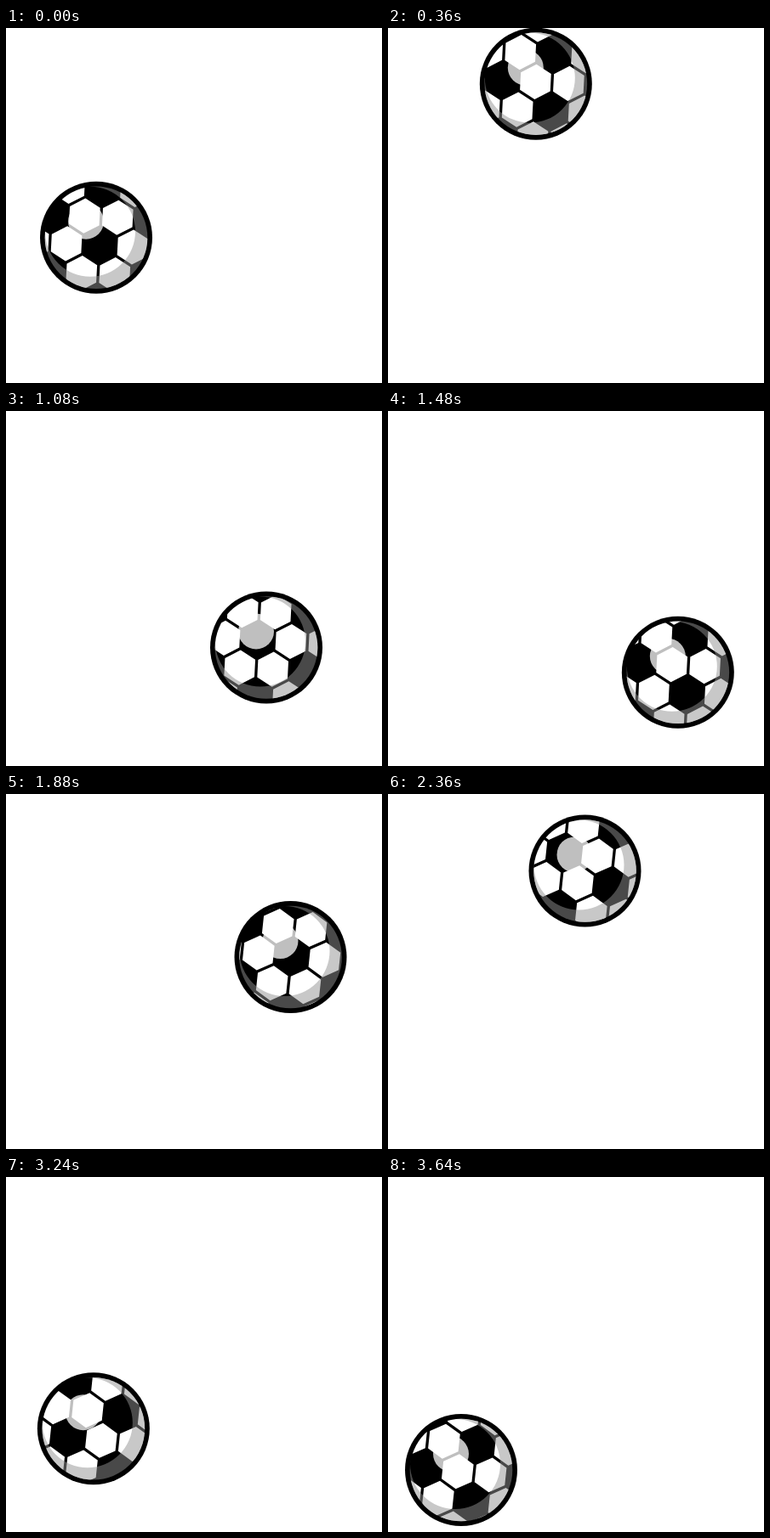
An HTML page with a canvas for the animation above (3.68 s loop, 442 by 418 pixels).

```html
<!DOCTYPE html>
<html lang="en">
<head>
<meta charset="utf-8">
<title>Bouncing ball</title>
<style>
  html, body { margin: 0; width: 100%; height: 100%; overflow: hidden; background: #fff; }
  canvas { display: block; }
</style>
</head>
<body>
<canvas id="stage" width="442" height="418"></canvas>
<script>
const ctx = document.getElementById('stage').getContext('2d');
const LOOP = 3680, STEP = 40, KICK = 1706;
const RADIUS = 66, FACE = 60.3;
const GROUND = 345, GRAVITY = 0.00102, REBOUNDS = [94, 24];
const SPACING = 39, HEX = 20.6, REPEAT = 3 * SPACING;

// The ball is kicked right, then back left.
// Poses: [time, x, pattern roll, pattern lift]
const flights = [
  { apex: 411, top: 59, tilt: 3, poses: [
    [0, 106, 4.5, 9], [720, 241, 150.5, -9], [1080, 306, 223.5, -8.5], [KICK, 358, 350, -9]
  ] },
  { apex: 2202, top: 65, tilt: 6, poses: [
    [KICK, 364, 383, -6], [1880, 334.5, 352, -1], [2360, 231.5, 266, 15],
    [2880, 150, 154, -2], [3360, 94, 67, 20], [LOOP - STEP, 86, 15.5, 36]
  ] }
];

// Smooth curve through one column of the poses
function follow(poses, column, t) {
  const last = poses.length - 1;
  const rate = i => (poses[i + 1][column] - poses[i][column]) / (poses[i + 1][0] - poses[i][0]);
  const slope = i => {
    if (i === 0) return rate(0);
    if (i === last) return rate(last - 1);
    const before = rate(i - 1), after = rate(i);
    return before * after <= 0 ? 0 : 2 * before * after / (before + after);
  };
  let i = 0;
  while (i < last - 1 && t >= poses[i + 1][0]) i++;
  const a = poses[i], b = poses[i + 1];
  const span = b[0] - a[0], k = (t - a[0]) / span;
  return a[column] + (b[column] - a[column]) * k * k * (3 - 2 * k) +
    span * k * (1 - k) * (slope(i) * (1 - k) - slope(i + 1) * k);
}

// A kicked rise with drag, then free fall and ever lower bounces
function heightAt({ apex, top }, t) {
  let d = t - apex, h = GROUND - top;
  if (d < 0) return top + 0.01234 * (-d) ** 1.6;
  for (const next of [...REBOUNDS, 0]) {
    const fall = Math.sqrt(h / GRAVITY);
    if (d < fall) return GROUND - h + GRAVITY * d * d;
    d -= fall + Math.sqrt(next / GRAVITY);
    h = next;
  }
  return GROUND;
}

function disc(x, y, r) {
  ctx.beginPath();
  ctx.arc(x, y, r, 0, Math.PI * 2);
}

function hexagon(x, y) {
  for (let n = 0; n < 6; n++) {
    const a = (n + 0.5) * Math.PI / 3;
    const px = x + HEX * Math.cos(a), py = y + HEX * Math.sin(a);
    n ? ctx.lineTo(px, py) : ctx.moveTo(px, py);
  }
  ctx.closePath();
}

// White tiles on black, every third tile left out
function drawPattern(roll, lift, tilt) {
  ctx.save();
  ctx.rotate(tilt * Math.PI / 180);
  ctx.translate(roll - REPEAT * Math.round(roll / REPEAT), lift);
  ctx.beginPath();
  for (let j = -5; j <= 5; j++) {
    for (let i = -8; i <= 8; i++) {
      if ((i - j) % 3) hexagon(SPACING * (i + j / 2), SPACING * j * Math.sqrt(0.75));
    }
  }
  ctx.fillStyle = '#fff';
  ctx.fill();
  ctx.restore();
}

function drawBall(t) {
  const flight = flights[t < KICK ? 0 : 1];
  const pose = column => follow(flight.poses, column, t);
  ctx.save();
  ctx.translate(pose(1), heightAt(flight, t));
  disc(0, 0, RADIUS);
  ctx.fillStyle = '#000';
  ctx.fill();

  disc(0, 0, FACE);
  ctx.clip();
  drawPattern(pose(2), pose(3), flight.tilt);

  // Shade outside the lit disc
  disc(0, 0, RADIUS);
  ctx.moveTo(46, -7);
  ctx.arc(-7, -7, 53, 0, Math.PI * 2);
  ctx.fillStyle = 'rgba(146, 146, 146, 0.5)';
  ctx.fill('evenodd');

  disc(-12, -19, 21);
  ctx.fillStyle = 'rgba(255, 255, 255, 0.75)';
  ctx.fill();
  ctx.restore();
}

function frame() {
  const t = Math.floor(performance.now() % LOOP / STEP) * STEP;
  ctx.fillStyle = '#fff';
  ctx.fillRect(0, 0, 442, 418);
  drawBall(t);
  requestAnimationFrame(frame);
}
frame();
</script>
</body>
</html>
```
